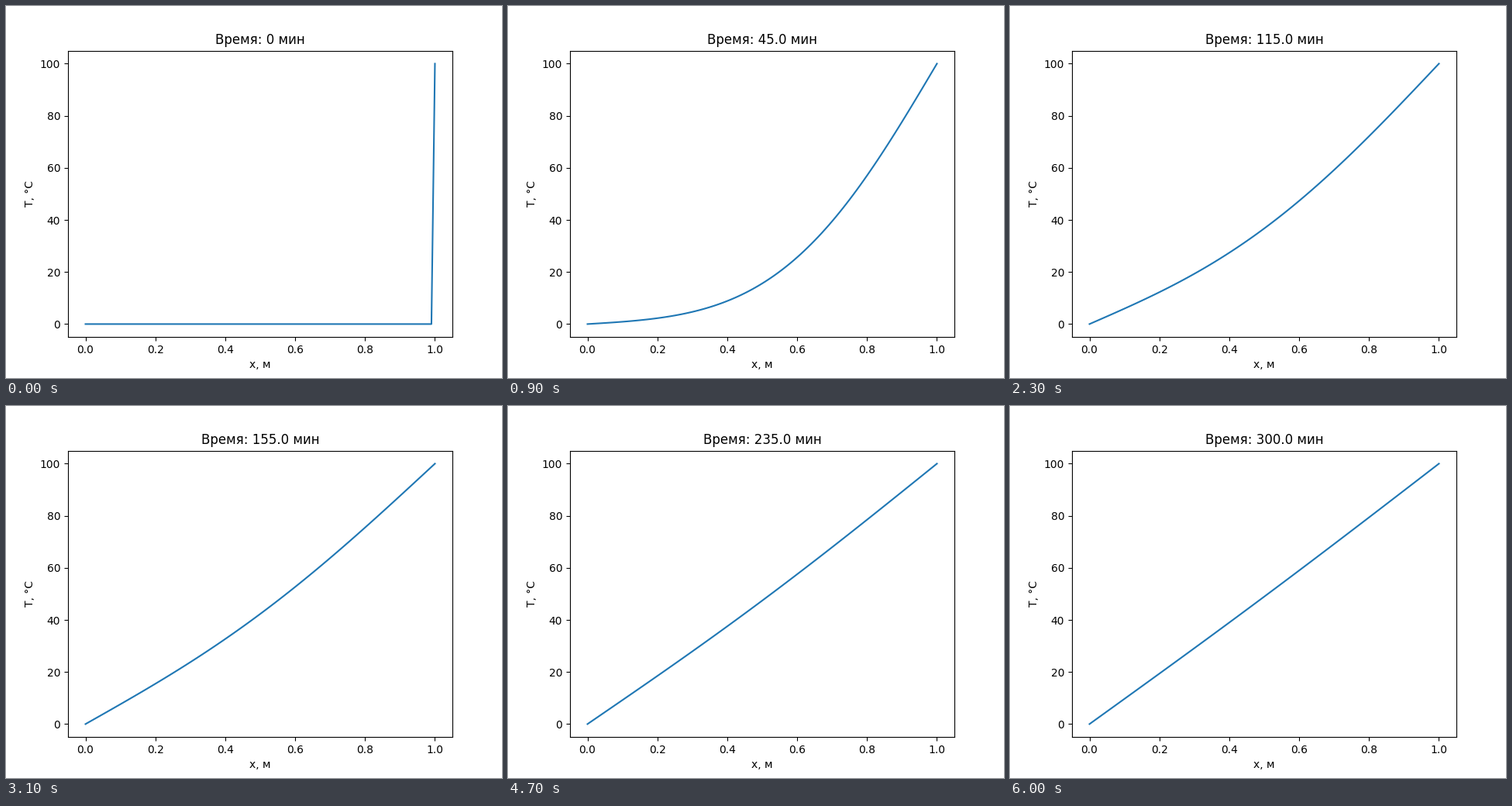
Recreate the animation shown at these times as a matplotlib script. Size 640x480 px, loop 7.1 s.

```python
import numpy as np
import matplotlib.pyplot as plt
from matplotlib.animation import FuncAnimation

DIFFUSIVITY = 2.3e-5  # m^2/s
T_HOT = 100.0
STEP_MIN = 5.0
LAST_STEP = 60
FRAMES = 71  # the final profile is held until the loop ends

x = np.linspace(0, 1, 101)
n = np.arange(1, 81)[:, None]
modes = 2 / (np.pi * n) * (-1.0) ** n * np.sin(np.pi * n * x)


def profile(minutes):
    """Temperature of a rod with ends kept at 0 and T_HOT."""
    if minutes == 0:
        return np.where(x == 1, T_HOT, 0.0)
    decay = np.exp(-DIFFUSIVITY * (np.pi * n) ** 2 * minutes * 60)
    return T_HOT * (x + (modes * decay).sum(axis=0))


plt.rcParams["font.family"] = "DejaVu Sans"
fig, ax = plt.subplots(figsize=(6.4, 4.8), dpi=100)
line, = ax.plot(x, profile(0), color="#1f77b4", lw=1.5)
ax.set(xlim=(-0.05, 1.05), ylim=(-5, 105), xlabel="x, м", ylabel="T, °C")
title = ax.set_title("Время: 0 мин")


def update(i):
    minutes = min(i, LAST_STEP) * STEP_MIN
    line.set_ydata(profile(minutes))
    title.set_text(f"Время: {minutes if i else 0} мин")
    return line, title


anim = FuncAnimation(fig, update, frames=FRAMES, interval=100,
                     repeat=True, repeat_delay=0, blit=False)
plt.show()
```
